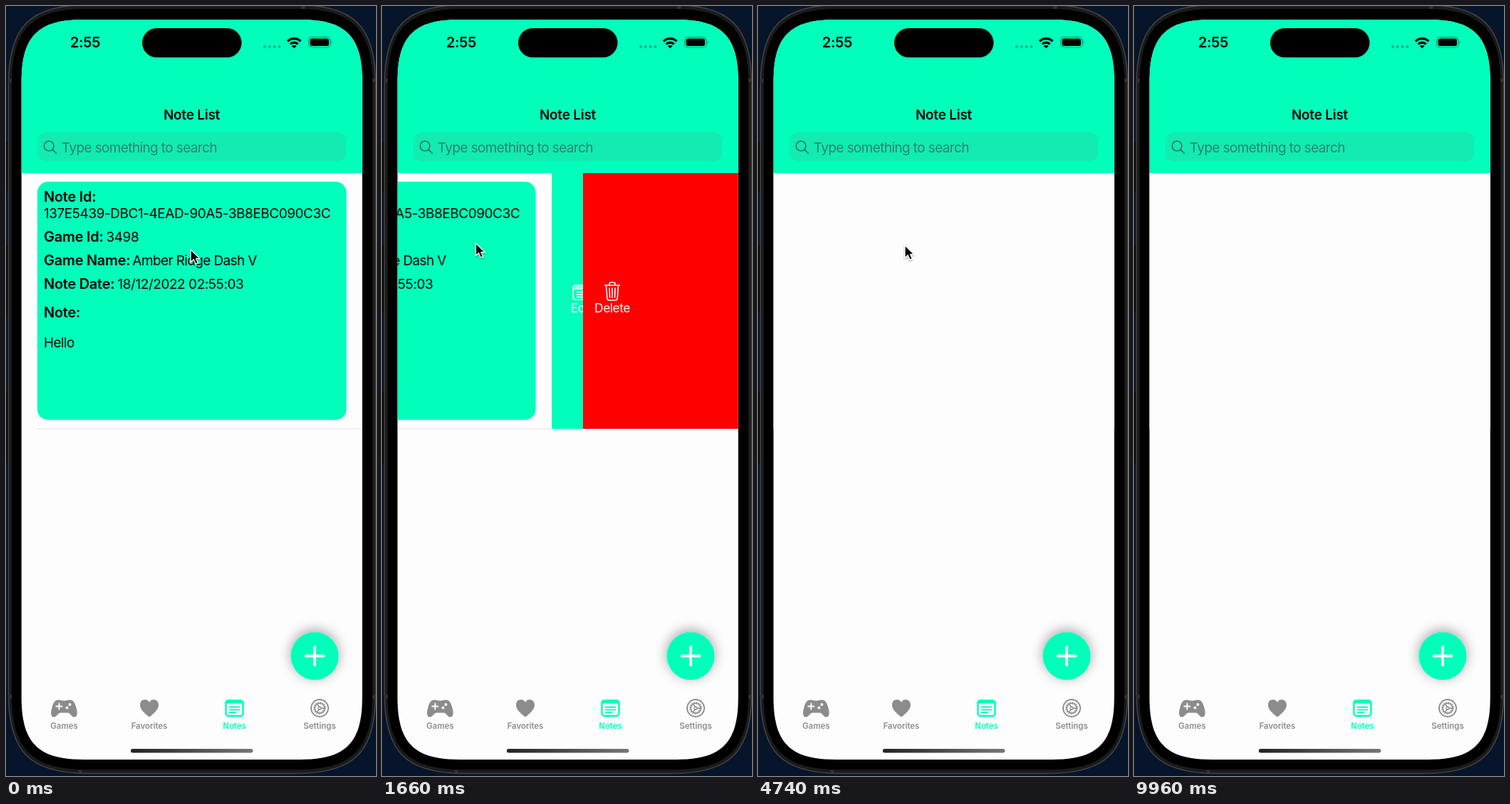
An HTML page that plays this animation: 519x1078 px, repeating every 9.98 s.

```html
<!DOCTYPE html>
<html lang="en">
<head>
<meta charset="utf-8">
<title>Note list</title>
<style>
  html, body { margin: 0; width: 100%; height: 100%; overflow: hidden; background: #06152a; }
  svg { display: block; width: 519px; height: 1078px; }
  :root { --mint: #00ffbb; --paper: #fdfdfd; --gray: #8c8c8c; }
  text { font: 400 18.9px Inter, "Open Sans", sans-serif; letter-spacing: -.03em; }
  .bold { font-size: 20px; font-weight: 600; letter-spacing: -.014em; }
  .title { font-weight: 600; letter-spacing: -.01em; text-anchor: middle; }
  .digits { letter-spacing: -.021em; }
  .action { font-size: 17.3px; letter-spacing: -.025em; fill: #fff; text-anchor: middle; }
  .tab { font-size: 11.4px; font-weight: 600; letter-spacing: 0; text-anchor: middle; }
  .line { fill: none; stroke: currentColor; stroke-linecap: round; stroke-linejoin: round; }

  .row, .delete, .cover, .cursor { animation: 9.98s ease-in-out infinite; }
  .row { animation-name: swipe; }
  .delete { animation-name: expand; }
  .cover { animation-name: collapse; transform-origin: 0 593px; }
  .cursor { animation-name: point; }

  @keyframes swipe {
    0%, 5% { transform: translateX(0); }
    12%, 13% { transform: translateX(-255px); }
    21.5%, 24% { transform: translateX(-273px); }
    30.5%, 34.5% { transform: translateX(-265px); }
    38%, 100% { transform: translateX(-480px); }
  }
  @keyframes expand {
    0%, 5% { transform: translateX(0); }
    12%, 15.5% { transform: translateX(115px); }
    17.5%, 24% { transform: translateX(.5px); }
    30%, 100% { transform: translateX(0); }
  }
  @keyframes collapse {
    0%, 35.5% { transform: scaleY(0); }
    39.5%, 100% { transform: scaleY(1); }
  }
  @keyframes point {
    0%, 1.5% { transform: translate(259px, 341px); }
    5% { transform: translate(406px, 337px); }
    12%, 13% { transform: translate(151px, 332px); }
    21.5%, 24% { transform: translate(99px, 332px); }
    30.5%, 36% { transform: translate(145px, 332px); }
    46%, 55% { transform: translate(206px, 335px); }
    68%, 71% { transform: translate(63px, 130px); }
    80%, 100% { transform: translate(30px, -30px); }
  }
</style>
</head>
<body>
<svg viewBox="0 0 519 1078">
  <defs>
    <clipPath id="screen"><path id="glass"/></clipPath>
    <linearGradient id="homeBar"><stop stop-color="#222"/><stop offset="1" stop-color="#777"/></linearGradient>
    <filter id="glow" x="-60%" y="-60%" width="220%" height="220%">
      <feDropShadow dx="0" dy="-3" stdDeviation="8.500" flood-opacity=".36"/>
    </filter>
    <filter id="soft" x="-50%" y="-50%" width="200%" height="200%">
      <feDropShadow dx="0" dy="1.5" stdDeviation="1" flood-opacity=".35"/>
    </filter>
  </defs>

  <!-- Device -->
  <rect width="519" height="1078" fill="#06152a"/>
  <path d="M0 190h3v70H0zM0 335h3v95H0zM0 540h3v100H0z" fill="#0b0b0b"/>
  <path id="frame" fill="#1b1b1b" stroke="#444" stroke-width="1.500"/>
  <path d="M3 104h5M3 967h5M513 104h5M513 967h5M417 0v4M104 1070v4" stroke="#333" stroke-width="5"/>
  <path id="bezel"/>

  <g clip-path="url(#screen)">
    <rect x="21" y="19" width="480" height="1036" fill="var(--paper)"/>

    <!-- Swipeable note -->
    <g class="row">
      <rect x="44" y="246" width="433.500" height="333.500" rx="15" fill="var(--mint)"/>
      <path d="M44 592h456" stroke="#dcdcf2"/>
      <text class="bold" x="53" y="274">Note Id:</text>
      <text class="digits" x="53" y="297">137E5439-DBC1-4EAD-90A5-3B8EBC090C3C</text>
      <text class="bold" x="53" y="330">Game Id:</text>
      <text class="digits" x="140.500" y="330">3498</text>
      <text class="bold" x="53" y="363">Game Name:</text>
      <text x="177.500" y="363">Amber Ridge Dash V</text>
      <text class="bold" x="53" y="396">Note Date:</text>
      <text class="digits" x="156.500" y="396">18/12/2022 02:55:03</text>
      <text class="bold" x="53" y="436">Note:</text>
      <text x="53" y="478">Hello</text>

      <g color="#fff">
        <rect x="500" y="234" width="480" height="358" fill="var(--mint)"/>
        <g class="line" stroke-width="1.600">
          <rect x="530" y="391" width="23" height="20" rx="3"/>
          <path d="M531 393.500h21M530 396h23M535 400.500h13M535 404h13M535 407.500h9"/>
        </g>
        <text class="action" x="541" y="429">Edit</text>
      </g>
      <g class="delete" color="#fff">
        <rect x="500" y="234" width="490" height="358" fill="#f00"/>
        <path class="line" stroke-width="1.600" d="M530.500 391h21M537 391v-2q0-2 2-2h4q2 0 2 2v2M532.500 391l1.300 18q.2 3 3 3h8.400q2.800 0 3-3l1.300-18M537 395l.5 13M541 395v13M545 395l-.5 13"/>
        <text class="action" x="541" y="429">Delete</text>
      </g>
    </g>
    <rect class="cover" x="21" y="234" width="480" height="359" fill="var(--paper)"/>

    <!-- Header -->
    <rect x="21" y="19" width="480" height="215" fill="var(--mint)"/>
    <text class="bold" x="90" y="58">2:55</text>
    <rect x="191" y="31" width="139.500" height="41" rx="20.500"/>
    <path d="M363 57h21" stroke="#000" stroke-opacity=".3" stroke-width="4" stroke-linecap="round" stroke-dasharray="0 6.800"/>
    <path d="M395 49.500a13 13 0 0 1 18.400 0M398.700 53.400a7.800 7.800 0 0 1 11 0" fill="none" stroke="#000" stroke-width="3.300"/>
    <path d="M404.200 59.500l-3.400-3.500a4.900 4.900 0 0 1 6.800 0z"/>
    <rect x="424.500" y="43.500" width="30.500" height="14.500" rx="4.500" fill="none" stroke="#000" stroke-opacity=".4" stroke-width="1.200"/>
    <rect x="426.500" y="45.500" width="26.500" height="10.500" rx="2.800"/>
    <path d="M456.500 48.500q2 2.300 0 4.600z" fill-opacity=".45"/>
    <text class="title" x="260.500" y="158.500">Note List</text>
    <rect x="44" y="177" width="433" height="40.500" rx="12" fill="#12ebb1"/>
    <g color="#2a8370">
      <path class="line" stroke-width="1.800" d="M53.500 196a6.800 6.800 0 1 0 13.600 0a6.800 6.800 0 1 0-13.600 0M65.300 201l5 5"/>
      <text x="78" y="204.500" fill="currentColor">Type something to search</text>
    </g>

    <!-- Add button -->
    <circle cx="433" cy="910" r="33.500" fill="var(--mint)" filter="url(#glow)"/>
    <path d="M420.500 910h25M433 897.500v25" stroke="#fff" stroke-width="3.800" stroke-linecap="round"/>

    <!-- Tabs -->
    <g fill="var(--gray)" color="var(--gray)">
      <path d="M73 971.500C76 971 78 972.500 81.500 972.500S87 971 90 971.500C95 972 97 976 99 984C100.500 990 100 995.500 96 995.500C92 995.500 90 990 87 989.500H76C73 990 71 995.500 67 995.500C63 995.500 62.500 990 64 984C66 976 68 972 73 971.500Z"/>
      <path d="M70.500 980.500h8M74.500 976.500v8" stroke="var(--paper)" stroke-width="2" stroke-linecap="round"/>
      <g fill="var(--paper)"><circle cx="85.500" cy="982.500" r="2"/><circle cx="89.500" cy="978" r="2"/></g>
      <path d="M201 995.500C195 991 188 985 188 978.500C188 974 191 971 195 971C197.500 971 200 972.500 201 975C202 972.500 204.500 971 207 971C211 971 214 974 214 978.500C214 985 207 991 201 995.500Z"/>
      <g class="line" stroke-width="1.800">
        <circle cx="440" cy="983" r="12"/>
        <circle cx="440" cy="983" r="6.800" stroke-width="1.600"/>
        <circle cx="440" cy="983" r="8" stroke-linecap="butt" stroke-dasharray="1.600 1.542"/>
        <path d="M442 983h4.500M439 981.300l-2.300-4M439 984.700l-2.300 4" stroke-width="1.400"/>
        <circle cx="440" cy="983" r="2" stroke-width="1.300"/>
      </g>
      <text class="tab" x="81.500" y="1012">Games</text>
      <text class="tab" x="201" y="1012">Favorites</text>
      <text class="tab" x="440" y="1012">Settings</text>
    </g>
    <g color="var(--mint)">
      <g class="line" stroke-width="2.400">
        <rect x="308.500" y="972.200" width="24" height="21.800" rx="3.500"/>
        <path d="M309.500 974.500h22" stroke-width="4"/>
        <path d="M313.500 981.500h14M313.500 985.300h14M313.500 989.100h9" stroke-width="1.800"/>
      </g>
      <text class="tab" x="320.500" y="1012" fill="currentColor">Notes</text>
    </g>
    <rect x="175" y="1040" width="171.500" height="5.500" rx="2.750" fill="url(#homeBar)"/>
  </g>

  <g class="cursor">
    <path d="M0 0V17.500L4.200 13.800L7 20.200L10.300 18.800L7.600 12.600H12.700Z" stroke="#fff" stroke-width="1.300" filter="url(#soft)"/>
  </g>
</svg>
<script>
  // Rounded box whose corners ease into the sides more gently than an arc.
  function squircle(id, left, top, right, bottom, radius) {
    const reach = radius * 1.3, pull = radius * 0.348;
    const corner = (x, y, dx, dy, fromSide) => {
      const onSide = d => [x, y + dy * d], onEnd = d => [x + dx * d, y];
      const [from, to] = fromSide ? [onSide, onEnd] : [onEnd, onSide];
      return `L${from(reach)}C${from(pull)} ${to(pull)} ${to(reach)}`;
    };
    const path = corner(left, top, 1, 1, true) + corner(right, top, -1, 1, false) +
      corner(right, bottom, -1, -1, true) + corner(left, bottom, 1, -1, false);
    document.getElementById(id).setAttribute("d", "M" + path.slice(1) + "Z");
  }
  squircle("frame", 3.5, -1.5, 518.5, 1074.5, 86);
  squircle("bezel", 8, 4, 514, 1069, 81);
  squircle("glass", 21.7, 19, 499.7, 1055, 67);
</script>
</body>
</html>
```
